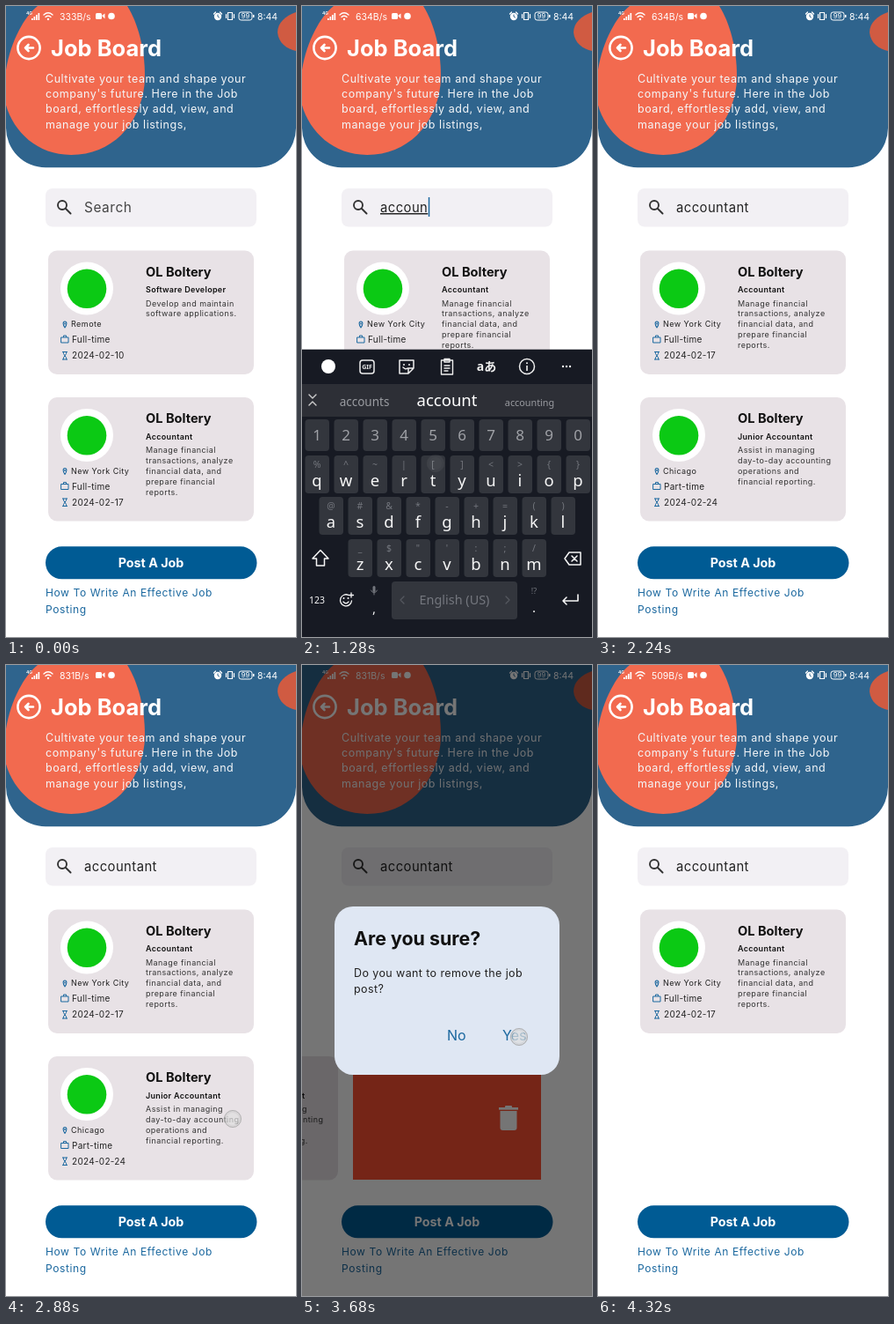
Write an HTML page that moves like this. It is 330 by 716 pixels and loops after 4.48 s.

```html
<!DOCTYPE html>
<html lang="en">
<head>
<meta charset="utf-8">
<title>Job board</title>
<style>
  html, body { margin: 0; width: 100%; height: 100%; overflow: hidden; background: #fff; }
  svg { display: block; width: 330px; height: 716px; font-family: Inter, sans-serif; white-space: pre; }
  .kb { font-family: "Noto Sans", "Noto Sans CJK JP", sans-serif; }
</style>
</head>
<body>
<svg id="stage" viewBox="0 0 330 716"></svg>
<script>
const LOOP = 4480, STEP = 80;
const BLUE = '#005b94', LINK = '#1b689f', INK = '#111', ORANGE = '#f26a4f';
const stage = document.getElementById('stage');

const clamp = v => Math.max(0, Math.min(1, v));
const ramp = (t, from, length) => clamp((t - from) / length);
const easeOut = u => 1 - (1 - u) ** 3;
const easeInOut = u => u * u * (3 - 2 * u);
const escapeText = s => s.replace(/&/g, '&amp;').replace(/</g, '&lt;');

const text = (x, y, s, size, fill = INK, spacing = 0, weight = 400, anchor = 'start') =>
  `<text x="${x}" y="${y}" font-size="${size}" fill="${fill}" letter-spacing="${spacing}" font-weight="${weight}" text-anchor="${anchor}">${escapeText(s)}</text>`;
const mid = (x, y, s, size, fill, weight = 400) => text(x, y, s, size, fill, 0, weight, 'middle');
const lines = (x, y, gap, rows, ...style) => rows.map((s, i) => text(x, y + gap * i, s, ...style)).join('');
const rect = (x, y, w, h, fill, r = 0) => `<rect x="${x}" y="${y}" width="${w}" height="${h}" rx="${r}" fill="${fill}"/>`;
const disc = (x, y, r, fill) => `<circle cx="${x}" cy="${y}" r="${r}" fill="${fill}"/>`;
const fillPath = (d, fill) => `<path d="${d}" fill="${fill}"/>`;
const stroke = (d, color, w = 1) =>
  `<path d="${d}" fill="none" stroke="${color}" stroke-width="${w}" stroke-linecap="round" stroke-linejoin="round"/>`;
const ring = (x, y, r, color, w = 1) => `<circle cx="${x}" cy="${y}" r="${r}" fill="none" stroke="${color}" stroke-width="${w}"/>`;
const group = (x, y, body, opacity = 1) => `<g transform="translate(${x} ${y})" opacity="${opacity}">${body}</g>`;

// Typing: one press time per letter; the letter lands two steps later.
const WORD = 'accountant';
const PRESSES = [560, 720, 880, 960, 1040, 1120, 1280, 1520, 1680, 1840];
const SUGGESTIONS = [
  ['I', 'The', "I'm"], ['w', 'a', 'Any'], ['ac', 'act', 'access'], ['access', 'acc', 'account'],
  ['accounts', 'account', 'accounting'], ['accountants', 'accountant', 'accounting']
];
const typedCount = (t, delay) => PRESSES.filter(p => p + delay <= t).length;

const KEY_ROWS = [
  { keys: '1234567890', hints: '', x: 17, y: 469, h: 36 },
  { keys: 'qwertyuiop', hints: '%^~|[]<>{}', x: 17, y: 510, h: 43 },
  { keys: 'asdfghjkl', hints: '@#&*-+=()', x: 33, y: 557, h: 43 },
  { keys: 'zxcvbnm', hints: '_$"\':;/', x: 66, y: 605, h: 43 }
];
const keySpot = letter => {
  const row = KEY_ROWS.find(r => r.keys.includes(letter));
  return [row.x + 33 * row.keys.indexOf(letter) + 3, row.y + 9];
};
const TAPS = [
  [80, 165, 228], ...PRESSES.map((p, i) => [p, ...keySpot(WORD[i])]),
  [2000, 305, 660], [3600, 247, 422]
];

const JOBS = [
  { title: 'Software Developer', place: 'Remote', kind: 'Full-time', date: '2024-02-10',
    about: ['Develop and maintain', 'software applications.'] },
  { title: 'Accountant', place: 'New York City', kind: 'Full-time', date: '2024-02-17',
    about: ['Manage financial', 'transactions, analyze', 'financial data, and', 'prepare financial', 'reports.'] },
  { title: 'Junior Accountant', place: 'Chicago', kind: 'Part-time', date: '2024-02-24',
    about: ['Assist in managing', 'day-to-day accounting', 'operations and', 'financial reporting.'] }
];

function statusBar(speed) {
  const w = '#fff';
  return text(23, 10, '4G', 5, w, 0, 600)
    + [0, 1, 2, 3].map(i => rect(29 + i * 2.5, 14 - i * 2, 1.7, 2 + i * 2, w)).join('')
    + stroke('M43 10Q48 5.500 53 10M45 12.500Q48 10 51 12.500', w, 1.4) + disc(48, 15, 1.2, w)
    + text(61, 16, speed + 'B/s', 10.5, w)
    + rect(102, 8, 7, 7, w, 1.5) + fillPath('M109 11l3.500-2.500v6z', w)
    + disc(120, 11.5, 3.8, w)
    + disc(241, 12, 4.2, w) + stroke('M236.500 9l2-2M245.500 9l-2-2', w, 1.3) + stroke('M241 10v2l1.500 1', '#2f648d')
    + stroke('M252.500 7.500h5v8h-5zM250.500 9.500v4M259.500 9.500v4', w, 1.2)
    + `<rect x="265" y="7" width="15" height="9" rx="2.500" fill="none" stroke="${w}"/>` + mid(272.5, 14.3, '99', 7.5, w)
    + rect(281, 10, 1.5, 3, w)
    + text(286, 16, '8:44', 10.5, w);
}

function header(speed) {
  const panel = 'M0 0H330V138A45 45 0 0 1 285 183.300H45A45 45 0 0 1 0 138Z';
  return `<clipPath id="head"><path d="${panel}"/></clipPath>` + fillPath(panel, '#2f648d') + '<g clip-path="url(#head)">'
    + fillPath('M36 0H138C152 22 160 58 157.500 90C152 135 120 169 74 169C32 169 4 138-2 104C-4 58 16 16 36 0Z', ORANGE)
    + fillPath('M330 7C318 11 309 19 309 30C310 42 320 49 330 51Z', '#d05b42') + '</g>'
    + statusBar(speed)
    + ring(26, 47.5, 12.6, '#fff', 2.6) + stroke('M31 47.500H22M25.500 44L22 47.500L25.500 51', '#fff', 2.6)
    + text(51, 56.8, 'Job Board', 25.5, '#fff', 0, 700)
    + lines(45, 86.500, 17.4, ['Cultivate your team and shape your', 'company\'s future. Here in the Job',
      'board, effortlessly add, view, and', 'manage your job listings,'], 12.5, '#f4f6f8', .54);
}

function searchBox(value, focused, showHint) {
  let out = rect(45, 207, 240, 43.5, '#f2f0f4', 8)
    + ring(64, 226, 5, '#333', 1.9) + stroke('M68 230L73.500 235.500', '#333', 2);
  if (showHint) return out + text(89, 234, 'Search', 15.4, '#444', .55);
  out += `<text x="89" y="234" font-size="14.800" letter-spacing=".45" fill="#222"${focused ? ' text-decoration="underline"' : ''}>`
    + `<tspan id="value">${value}</tspan></text>`;
  if (focused && value) out += rect(0, 217, 1.5, 22, LINK).replace('<rect', '<rect id="caret"');
  return out;
}

function card(job, y) {
  return group(0, y, rect(48, 0, 234, 140.5, '#e8e2e6', 10)
    + disc(92, 43, 30, '#fff') + disc(92, 43.3, 22.3, '#0bc914')
    + text(159, 29, 'OL Boltery', 14.6, INK, 0, 700)
    + text(159, 47.5, job.title, 9, INK, .3, 600)
    + lines(159, 63, 11.9, job.about, 9, '#333', .45)
    + stroke('M67 87.500C64.500 84 64.500 80.500 67 80.500S69.500 84 67 87.500Z', LINK, 1.1) + disc(67, 83, .9, LINK)
    + text(74, 86.8, job.place, 9, '#222', .45)
    + stroke('M63 98.500H71V104.500H63ZM65.500 98V96.500H68.500V98', LINK)
    + text(75, 104.5, job.kind, 10, '#222', .28)
    + stroke('M64.500 115H69.500M64.500 123.500H69.500M65 115C65 119 69 119.500 69 123.500M69 115C69 119 65 119.500 65 123.500', LINK)
    + text(75, 122.7, job.date, 10, '#222', .28));
}

function swipedRow(job, offset, collapse) {
  const height = 140 * (1 - collapse), edge = Math.max(58, 285 + offset);
  let out = '';
  if (offset && height > 0) {
    out += `<clipPath id="bare"><rect x="${edge}" y="444" width="${Math.max(0, 272 - edge)}" height="${height}"/></clipPath>`
      + `<g clip-path="url(#bare)">${rect(58, 444, 214, 140, '#ff5233')}`
      + group(235, 444 + height / 2, rect(-11, -12, 22, 2.7, '#fff') + rect(-4, -14, 8, 3, '#fff', 1)
        + fillPath('M-9.500-8H9.500V11Q9.500 14 6.500 14H-6.500Q-9.500 14-9.500 11Z', '#fff')) + '</g>';
  }
  return out + (collapse ? '' : group(offset, 0, card(job, 444)));
}

function toolbar() {
  const w = '#eee', box = x => `<rect x="${x - 8}" y="402" width="16" height="15" rx="3" fill="none" stroke="${w}" stroke-width="1.500"/>`;
  return disc(30, 409, 8, '#fff')
    + box(74) + mid(74, 412.3, 'GIF', 7, w, 700)
    + stroke('M111 402H127V411L121 417H111ZM127 411H121V417M115 410Q118 413 120 411', w, 1.5) + disc(116, 407, 1, w) + disc(122, 407, 1, w)
    + stroke('M158.500 402H171.500V418H158.500ZM162 400.500H168V404H162ZM162 408H168M162 411H168M162 414H166', w, 1.4)
    + mid(210, 414, 'aあ', 14, w, 600)
    + ring(256, 409, 8.5, w, 1.5) + rect(255.2, 408, 1.6, 6, w) + disc(256, 405.3, 1, w)
    + [297, 301, 305].map(x => disc(x, 409, 1.2, w)).join('');
}

function keyboard(words) {
  const w = '#f6f6f6', grey = '#74777e', keyFill = '#33363d';
  const sizes = [108, 150, 108];
  let out = rect(0, 389.7, 330, 327, '#171a23') + toolbar() + rect(0, 429, 330, 37, '#2d2f36')
    + stroke('M8 441L12 445L16 441M8 453L12 449L16 453', '#ccc', 1.4)
    + words.map((s, i) => mid(71 + 94 * i, 454, s, Math.min(18.5, sizes[i] / s.length), i === 1 ? '#fff' : '#9a9ca1', i === 1 ? 500 : 400)).join('');
  for (const { keys, hints, x, y, h } of KEY_ROWS) {
    [...keys].forEach((k, i) => {
      const cx = x + 33 * i;
      out += rect(cx - 13.5, y, 27.5, h, keyFill, 4)
        + (hints ? mid(cx, y + 14, hints[i], 10.5, grey) + mid(cx, y + 34.5, k, 18.5, w, 500) : mid(cx, y + 24, k, 17, '#a0a2a7'));
    });
  }
  return out
    + stroke('M21 617.500L30 627H25.500V635H16.500V627H12Z', w, 1.5)
    + stroke('M304 620H317V634H304L299 627ZM307 624L313 630M313 624L307 630', w, 1.5)
    + mid(17, 678, '123', 10.5, w)
    + stroke('M53 668.500A6.500 6.500 0 1 0 56.500 675M47 676Q50 679.500 53 676M56 666V671M53.500 668.500H58.500', w, 1.3)
    + disc(47.5, 672, 1, w) + disc(52.500, 672, 1, w)
    + rect(80.5, 658, 3, 7, grey, 1.5) + stroke('M78.500 663Q82 669 85.500 663M82 666V668', grey)
    + mid(82, 689, ',', 15, w)
    + rect(102, 653, 143, 43, keyFill, 4) + mid(173.5, 679, 'English (US)', 14.4, grey)
    + stroke('M116 670L112 674L116 678M232 670L236 674L232 678', '#55585f', 1.2)
    + mid(264, 667, '!?', 9, grey) + mid(264, 688, '.', 15, w)
    + stroke('M314 668V675H297M301 671L297 675L301 679', w, 1.6);
}

function dialog(opacity) {
  return group(0, 0, rect(0, 0, 330, 716, 'rgba(0,0,0,.54)') + rect(37, 274, 256, 191, '#dfe7f3', 21)
    + text(59, 318, 'Are you sure?', 21.4, INK, 0, 700)
    + lines(59, 353.5, 18.3, ['Do you want to remove the job', 'post?'], 12.5, '#222', .4)
    + text(165, 426, 'No', 16, LINK) + text(228, 426, 'Yes', 16, LINK), opacity);
}

const touch = (x, y, opacity) =>
  group(x, y, disc(0, 0, 10, 'rgba(205,205,205,.72)') + ring(0, 0, 9.5, '#999', .8) + disc(0, 0, 7, 'rgba(235,235,235,.5)'), opacity);

function touches(t, offset) {
  const taps = TAPS.map(([at, x, y]) => {
    const age = t - at;
    return age < 0 || age >= 160 ? '' : touch(x, y, age < 80 ? .1 : .85);
  });
  if (t >= 2880 && t < 3120) taps.push(touch(258 + offset, 515, .8));
  return taps.join('');
}

function draw(t) {
  const typed = typedCount(t, 160), hinted = typedCount(t, 80);
  const speed = t < 1200 ? 333 : t < 2560 ? 634 : t < 4000 ? 831 : 509;
  const jobs = typed < 2 ? JOBS : JOBS.slice(1);
  const focused = t >= 240 && t < 2080;
  const offset = -241 * easeInOut(ramp(t, 2880, 320));
  const raised = easeOut(ramp(t, 160, 400)) - easeInOut(ramp(t, 2000, 240));
  const shade = ramp(t, 3280, 160) - ramp(t, 3760, 160);
  const words = SUGGESTIONS[hinted > 7 ? 5 : Math.min(hinted, 4)];

  stage.innerHTML = rect(0, 0, 330, 716, '#fff') + header(speed)
    + searchBox(WORD.slice(0, typed), focused, t < 240)
    + card(jobs[0], 277.5) + swipedRow(jobs[1], offset, easeInOut(ramp(t, 3920, 320)))
    + rect(45, 613.3, 240.5, 37, BLUE, 18.5) + mid(165, 637, 'Post A Job', 14.3, '#fff', 700)
    + lines(45, 670, 18.7, ['How To Write An Effective Job', 'Posting'], 12, LINK, .6)
    + (raised > 0 ? `<g class="kb">${group(0, 326 * (1 - raised), keyboard(words))}</g>` : '')
    + (shade > 0 ? dialog(shade) : '') + touches(t, offset);

  const caret = document.getElementById('caret');
  if (caret) caret.setAttribute('x', 89.5 + document.getElementById('value').getComputedTextLength());
}

let last = -1;
function tick() {
  const t = Math.floor(performance.now() % LOOP / STEP) * STEP;
  if (t !== last) draw(last = t);
  requestAnimationFrame(tick);
}
tick();
</script>
</body>
</html>
```
